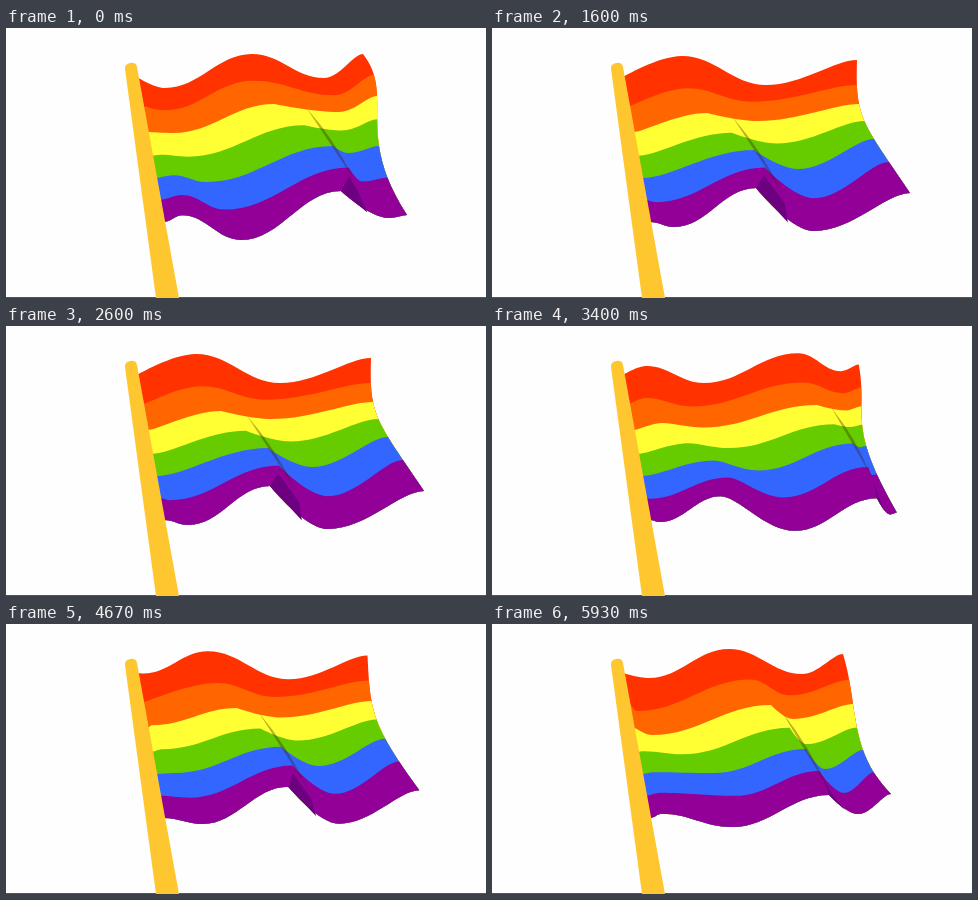
Write an HTML page with a canvas that moves like this. It is 480 px wide and 270 px high and loops after 5990 ms.

```html
<!DOCTYPE html>
<html lang="en">
<head>
<meta charset="utf-8">
<title>Waving flag</title>
<style>
html, body { margin: 0; width: 100%; height: 100%; overflow: hidden; background: #fefefe; }
canvas { display: block; width: 480px; height: 270px; }
</style>
</head>
<body>
<canvas id="stage" width="480" height="270"></canvas>
<script>
const ctx = document.getElementById('stage').getContext('2d');
const LOOP = 5990, STEP = 1000 / 15, POSES = 13;
const COLORS = ['#ff3200', '#ff6600', '#ffff33', '#66cc00', '#3366ff', '#930098'];

// Ridges and valleys run down the cloth. Each is a cubic through four points,
// and the stripe boundaries swing from one to the next.
const POLE = [[131, 49], [142, 104], [150, 150], [158, 194]];
const NEWBORN = [[131, 48], [142, 105], [195, 143], [205, 177]];
const KEYS = [
  { at: 8,
    valley: [[131, 48], [141, 98], [152, 149], [182, 199]],
    crest: [[190, 28], [215, 85], [262, 122], [264, 160]],
    trough: [[274, 57], [266, 93], [306, 141], [322, 203]],
    edge: [[365, 32], [367, 76], [382, 111], [418, 165]] },
  { at: 12,
    valley: [[157, 54], [160, 111], [222, 149], [240, 203]],
    crest: [[237, 25], [279, 81], [314, 125], [337, 171]],
    trough: [[310, 50], [301, 95], [333, 145], [366, 190]],
    edge: [[351, 30], [361, 80], [371, 126], [399, 170]] },
  { at: 13,
    valley: [[159, 60], [167, 105], [200, 154], [235, 212]],
    crest: [[246, 26], [268, 76], [327, 118], [335, 163]],
    trough: [[318, 50], [333, 84], [342, 125], [383, 190]],
    edge: [[357, 26], [371, 68], [373, 118], [401, 187]] },
  { at: 16,
    valley: [[170, 57], [175, 107], [240, 147], [290, 206]],
    crest: [[267, 24], [297, 81], [347, 122], [363, 177]],
    trough: [[338, 54], [345, 90], [358, 128], [385, 204]],
    edge: [[368, 43], [371, 83], [369, 126], [396, 201]] }
];

const mix = (a, b, s) => Array.isArray(a) ? a.map((v, i) => mix(v, b[i], s)) : a + (b - a) * s;

// Point on a ridge at stripe boundary i (0 at the top, 6 at the hem).
function along(ridge, i) {
  const u = i / 2;
  return [0, 1].map(axis => ridge.reduce((sum, pt, j) => {
    let w = pt[axis];
    for (let k = 0; k < 4; k++) if (k !== j) w *= (u - k) / (j - k);
    return sum + w;
  }, 0));
}

// Ridges from pole to free end; soft is how rounded the far side of a ridge is.
function cloth(p) {
  const node = (line, soft = 1) => ({ line, soft });
  if (p > 3 && p < 8) {
    const a = KEYS[3], b = KEYS[0], s = (p - 3) / 5;
    const crest = mix(a.crest, b.edge, s), trough = mix(a.trough, b.edge, s);
    const edge = mix(a.edge, b.edge, s);
    return { crest, trough, edge, nodes: [
      node(POLE), node(mix(POLE, b.valley, s)), node(mix(NEWBORN, b.crest, s), 1 - s),
      node(mix(a.valley, b.trough, s)), node(crest, 0), node(trough), node(edge)] };
  }
  const q = p < 8 ? p + POSES : p;
  const n = Math.max(1, KEYS.findIndex(k => k.at >= q));
  const a = KEYS[n - 1], b = KEYS[n], s = (q - a.at) / (b.at - a.at);
  const [valley, crest, trough, edge] =
    ['valley', 'crest', 'trough', 'edge'].map(name => mix(a[name], b[name], s));
  const newborn = mix(POLE, NEWBORN, ((q - 8) / 8) ** 2);
  return { crest, trough, edge, nodes: [
    node(POLE), node(newborn), node(valley), node(crest, 0), node(trough), node(edge)] };
}

// Bezier segments of boundary i, level at every ridge; ridges that touch are merged.
function boundary(nodes, i) {
  const stops = [];
  nodes.forEach(({ line, soft }, n) => {
    const pt = along(line, i), last = stops[stops.length - 1];
    const close = last && pt[0] < last.pt[0] + 3;
    if (close && n < nodes.length - 1) return;
    if (close) stops.pop();
    stops.push({ pt, soft: i < 2 ? 1 : soft });
  });
  return stops.slice(1).map((to, n) => {
    const [px, py] = stops[n].pt, [qx, qy] = to.pt, dx = qx - px;
    const out = n ? 0.4 * stops[n].soft : 0.4 * i / 6;
    const into = n === stops.length - 2 ? 0.25 : 0.4;
    return [[px, py], [px + dx * out, py], [qx - dx * into, qy], [qx, qy]];
  });
}

function trace(segments) {
  ctx.lineTo(...segments[0][0]);
  segments.forEach(([, b, c, d]) => ctx.bezierCurveTo(...b, ...c, ...d));
}

function fill(color, path) {
  ctx.beginPath();
  path();
  ctx.closePath();
  ctx.fillStyle = color;
  ctx.fill();
}

// Underside of the cloth below the fold, and the shadow along it.
function drawFold(crest, trough) {
  const between = (i, sx, sy) => {
    const [cx, cy] = along(crest, i), [tx, ty] = along(trough, i);
    return [mix(cx, tx, sx), mix(cy, ty, sy)];
  };
  fill('#6c0080', () => {
    [between(6, 0, 0), between(5.4, 0, 0), between(5.4, 0.4, 0.8), between(6, 0.55, 0.8)]
      .forEach(pt => ctx.lineTo(...pt));
  });
  const from = between(2, 0.5, 0.5), to = between(5, 0.35, 0.8);
  const [mx, my] = mix(from, to, 0.5);
  fill('rgba(60, 30, 0, .35)', () => {
    ctx.moveTo(...from);
    ctx.quadraticCurveTo(mx + 5, my - 3, ...to);
  });
}

function draw(p) {
  const { nodes, crest, trough, edge } = cloth(p);
  const hem = boundary(nodes, 6).map(s => s.reverse()).reverse();

  ctx.fillStyle = '#fefefe';
  ctx.fillRect(0, 0, 480, 270);
  ctx.fillStyle = '#555';
  ctx.fillRect(0, 269, 480, 1);

  // Every stripe reaches down to the hem and is covered by the next.
  COLORS.forEach((color, i) => fill(color, () => {
    trace(boundary(nodes, i));
    for (let t = i; t <= 6; t += 0.25) ctx.lineTo(...along(edge, t));
    trace(hem);
  }));
  drawFold(crest, trough);

  fill('#ffc72f', () => {
    ctx.moveTo(150, 270);
    ctx.lineTo(119, 41);
    ctx.quadraticCurveTo(118.5, 36, 124, 35);
    ctx.quadraticCurveTo(130, 34, 131, 39);
    ctx.lineTo(173, 270);
  });
}

// Thirteen poses a second, shown on a clock of fifteen ticks rounded to 10 ms.
function poseAt(t) {
  let k = Math.ceil(t / STEP);
  while (Math.round(k * STEP / 10) * 10 > t) k--;
  return Math.floor((k * POSES + 7) / 15) % POSES;
}

const start = performance.now();
function tick() {
  draw(poseAt((performance.now() - start) % LOOP));
  requestAnimationFrame(tick);
}
tick();
</script>
</body>
</html>
```
